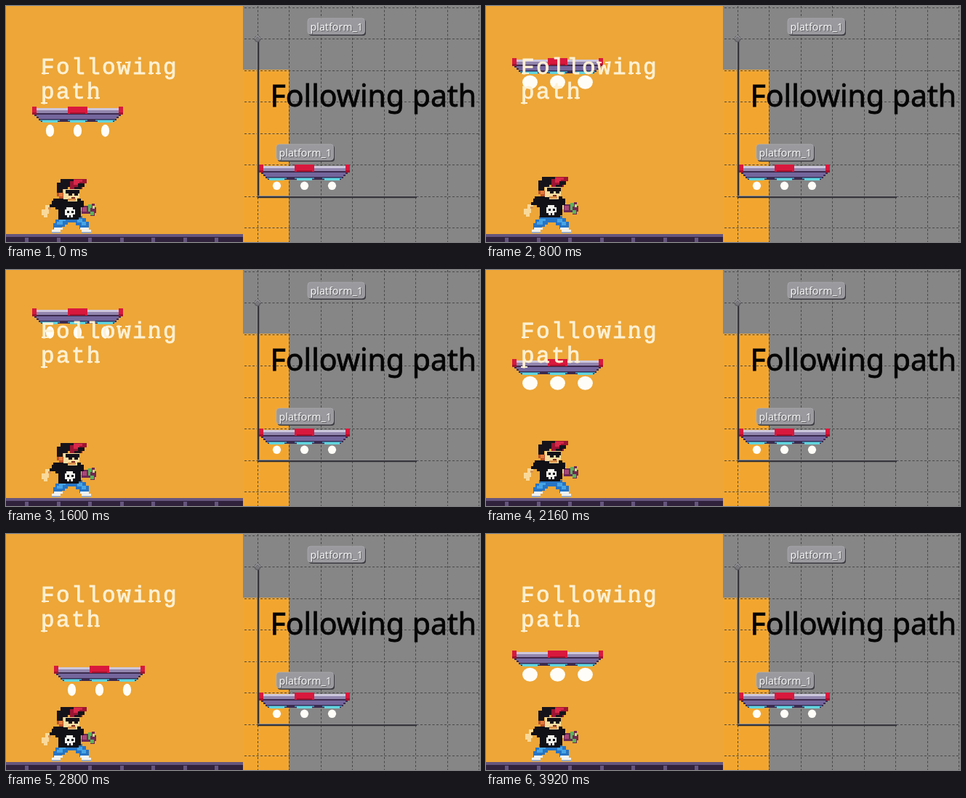
Recreate the animation shown at these times as an HTML page. Size 652 by 326 pixels, loop 4 s.

```html
<!DOCTYPE html>
<html lang="en">
<head>
<meta charset="utf-8">
<title>Following path</title>
<style>
  html, body { margin: 0; width: 100%; height: 100%; overflow: hidden; background: #eda637; }
  svg { display: block; width: 652px; height: 326px; }
  .art { shape-rendering: crispEdges; }
  .title { font: 31px "Liberation Mono", monospace; letter-spacing: 2.4px; stroke: #fdf1d4; stroke-width: .8; }
  .note { font: 41px "Noto Sans", sans-serif; fill: #050505; stroke: #050505; stroke-width: .8; }
  .tag { font: 14.2px "Noto Sans", sans-serif; fill: #f6f6f6; filter: drop-shadow(1px 1px 0 #5c5c60); }
</style>
</head>
<body>
<svg viewBox="0 0 652 326">
  <defs>
    <g id="deck" class="art">
      <path fill="#3b2a4e" d="M3 9h119v4h-3v3h-3v3h-3v2h-101v-2h-3v-3h-3v-3h-3z"/>
      <path fill="#74669d" d="M6 11h113v3h-3v3h-107v-3h-3z"/>
      <path fill="#9286ae" d="M5 5h115v4h-115z"/>
      <path fill="#cdc7dc" d="M5 2h115v3h-115z"/>
      <path fill="#d9183d" d="M0 0h6v11h-6zM119 0h6v11h-6zM49 0h27v10h-27z"/>
      <path fill="#a6122f" d="M0 8h6v3h-6zM119 8h6v3h-6zM52 8h21v2h-21z"/>
      <path fill="#3e86ad" d="M11 18h27v2h-27zM49 18h27v2h-27zM87 18h27v2h-27z"/>
      <path fill="#63d5dc" d="M14 19h21v3h-21zM52 19h21v3h-21zM90 19h21v3h-21z"/>
    </g>
    <g id="tag">
      <rect x="1.500" y="1.500" width="78.500" height="22.500" rx="4" fill="#3c3c42"/>
      <rect width="78.500" height="22" rx="4" fill="#99999e" stroke="#b0b0b4" stroke-width=".7"/>
      <text class="tag" x="3.500" y="17">platform_1</text>
    </g>
  </defs>

  <rect width="326" height="326" fill="#eda637"/>
  <g id="floor" class="art"></g>

  <g class="art">
    <g id="legs">
      <path fill="#2774c4" d="M73 290h32v3h5v5h4v10h-13v-5h-5v-4h-11v3h-4v3h-4v3h-12v-8h3v-5h5z"/>
      <path fill="#46a5e6" d="M73 294h9v3h-4v5h-8v-4h3zM98 294h7v4h5v5h-6v-4h-6z"/>
      <path fill="#f0f1f0" d="M66 306h12v3h-3v5h-12v-5h3zM102 306h12v3h3v5h-13v-5h-2z"/>
      <path fill="#9caabd" d="M63 312h12v2h-12zM104 312h13v2h-13z"/>
    </g>
    <g id="arm">
      <path fill="#f9d99a" d="M54 275h8v6h-3v6h-2v5h-5v-3h-3v-8h5z"/>
      <path fill="#d9924c" d="M58 278h4v3h-4z"/>
    </g>
    <g id="board">
      <path fill="#f9d99a" d="M101 274h6v9h-6z"/>
      <path fill="#6f2852" d="M104 276h14v-3h4v5h2v8h-2v4h-6v-3h-12z"/>
      <path fill="#a94775" d="M105 278h6v6h-6z"/>
      <path fill="#57b45b" d="M113 274h5v5h-5zM116 284h5v5h-5zM113 279h3v5h-3z"/>
      <path fill="#bde08a" d="M119 276h3v4h-3z"/>
    </g>
    <g id="body">
      <path fill="#111016" d="M65 266h38v3h4v9h-4v14h-3v3h-28v-14h-4v-3h-8v-4h3v-5h2z"/>
      <path fill="#f4f2ee" d="M83 278h9v3h3v7h-3v4h-8v-3h-3v-8h2z"/>
      <path fill="#111016" d="M84 283h3v3h-3zM90 283h3v3h-3zM87 289h2v3h-2z"/>
      <path fill="#b9522c" d="M70 255h8v3h3v8h-8v-3h-3z"/>
      <path fill="#e27b39" d="M73 258h5v5h-5z"/>
      <path fill="#fadca0" d="M79 253h22v12h-3v5h-13v-3h-6z"/>
      <path fill="#d9924c" d="M85 266h11v3h-11z"/>
      <path fill="#7c2c22" d="M90 264h5v2h-5z"/>
      <path fill="#121018" d="M82 254h19v5h-2v3h-5v-3h-3v3h-5v-3h-4z"/>
      <path fill="#16131b" d="M75 239h19v3h5v8h-14v3h-7v5h-8v-14h5z"/>
      <path fill="#9c1532" d="M88 242h5v-3h18v6h-3v5h-3v3h-17z"/>
      <path fill="#d8284a" d="M93 240h12v3h-4v4h-8z"/>
      <path fill="#16131b" d="M99 245h9v5h-5v3h-9v-3h5z"/>
    </g>
  </g>

  <g id="platform">
    <use href="#deck"/>
    <g id="flames" fill="#fffdf7"></g>
  </g>
  <g fill="#fdf1d4">
    <text class="title" x="48" y="94">Following</text>
    <text class="title" x="48" y="128">path</text>
    <path d="M49 92h10v2h-10zM152 77h7v2h-7zM164 77h7v2h-7zM196 92h7v2h-7zM206 92h7v2h-7z
             M48 133h9v2h-9zM112 126h7v2h-7zM122 126h7v2h-7z"/>
  </g>

  <rect x="326" width="326" height="326" fill="#868686"/>
  <rect x="326" y="88" width="63" height="238" fill="#f3a62f"/>
  <g id="grid" fill="none" stroke="#484848" stroke-width="1" stroke-dasharray="3 2.500"></g>
  <path d="M347 45V264H565" fill="none" stroke="#34343a" stroke-width="2.500"/>
  <path d="M345.500 48V262.500H565" fill="none" stroke="#8e8e92" stroke-width="1"/>
  <circle cx="346" cy="45.500" r="4" fill="#77777b" stroke="#55555a" stroke-width="1"/>
  <path d="M342 45l4-4 4 4" fill="none" stroke="#a8a8ac"/>
  <use href="#deck" x="348" y="219"/>
  <g id="lamps" fill="#fffdf7"></g>
  <use href="#tag" x="415" y="17"/>
  <use href="#tag" x="372" y="191"/>
  <text class="note" x="363.500" y="138.500">Following path</text>
</svg>
<script>
const LOOP = 4000, STEP = 80, CELL = 43.55;
const LEFT = 36, CORNER = 182, IDLE = 1320;
const $ = id => document.getElementById(id);

function add(parent, tag, attrs) {
  const el = document.createElementNS('http://www.w3.org/2000/svg', tag);
  for (const key in attrs) el.setAttribute(key, attrs[key]);
  return parent.appendChild(el);
}

const jets = [24.5, 62.5, 100.5];
const flames = jets.map(cx => add($('flames'), 'ellipse', { cx, cy: 33.3 }));
jets.forEach(x => add($('lamps'), 'ellipse', { cx: 348 + x, cy: 248.3, rx: 5.6, ry: 5.8 }));

// Sit one-pixel lines on pixel centres
const crisp = v => Math.floor(v) + .5;
for (let i = 0; i < 8; i++) {
  add($('grid'), 'path', { d: `M328 ${crisp(2 + i * CELL)}H652` });
  add($('grid'), 'path', { d: `M${crisp(346 + i * CELL)} 0V326` });
}

const bar = (x, y, width, height, fill) => add($('floor'), 'rect', { x, y, width, height, fill });
bar(0, 315, 326, 11, '#30213c');
bar(0, 315, 326, 4, '#65557e');
for (let x = 26; x < 326; x += CELL) bar(x, 320, 5, 6, '#65557e');

// Time and distance along the path, measured as height down to the corner
const route = [
  [0, 139], [800, 72], [1320, 18], [1600, 53], [2160, 123],
  [2800, 212], [3160, 259], [3280, 245], [3920, 161], [4000, 150]
];

function travel(t) {
  const i = route.findIndex(p => p[0] > t);
  const [t0, a] = route[i - 1], [t1, b] = route[i];
  return a + (b - a) * (t - t0) / (t1 - t0);
}

// Each pose ends at a share of the idle cycle
const poses = [
  { end: .3, body: [0, 0], arm: [0, 0], board: [0, 0], wide: false },
  { end: .55, body: [-1, 0], arm: [0, -6], board: [0, -2], wide: true },
  { end: .8, body: [2, -3], arm: [3, -1], board: [3, -2], wide: true },
  { end: 1, body: [2, 0], arm: [5, -5], board: [3, -1], wide: true }
];

const move = (id, [x, y]) => $(id).setAttribute('transform', `translate(${x} ${y})`);

function draw(t) {
  const s = travel(t);
  move('platform', [LEFT + Math.max(0, s - CORNER), Math.min(s, CORNER)].map(Math.round));
  const phase = t % IDLE / IDLE;
  const pose = poses.find(p => phase < p.end);
  for (const id of ['body', 'arm', 'board']) move(id, pose[id]);
  for (const f of flames) {
    f.setAttribute('rx', pose.wide ? 10.4 : 5.6);
    f.setAttribute('ry', pose.wide ? 9.5 : 8.5);
  }
}

const start = performance.now();
function tick() {
  const t = (performance.now() - start) % LOOP;
  draw(Math.floor(t / STEP) * STEP);
  requestAnimationFrame(tick);
}
tick();
</script>
</body>
</html>
```
